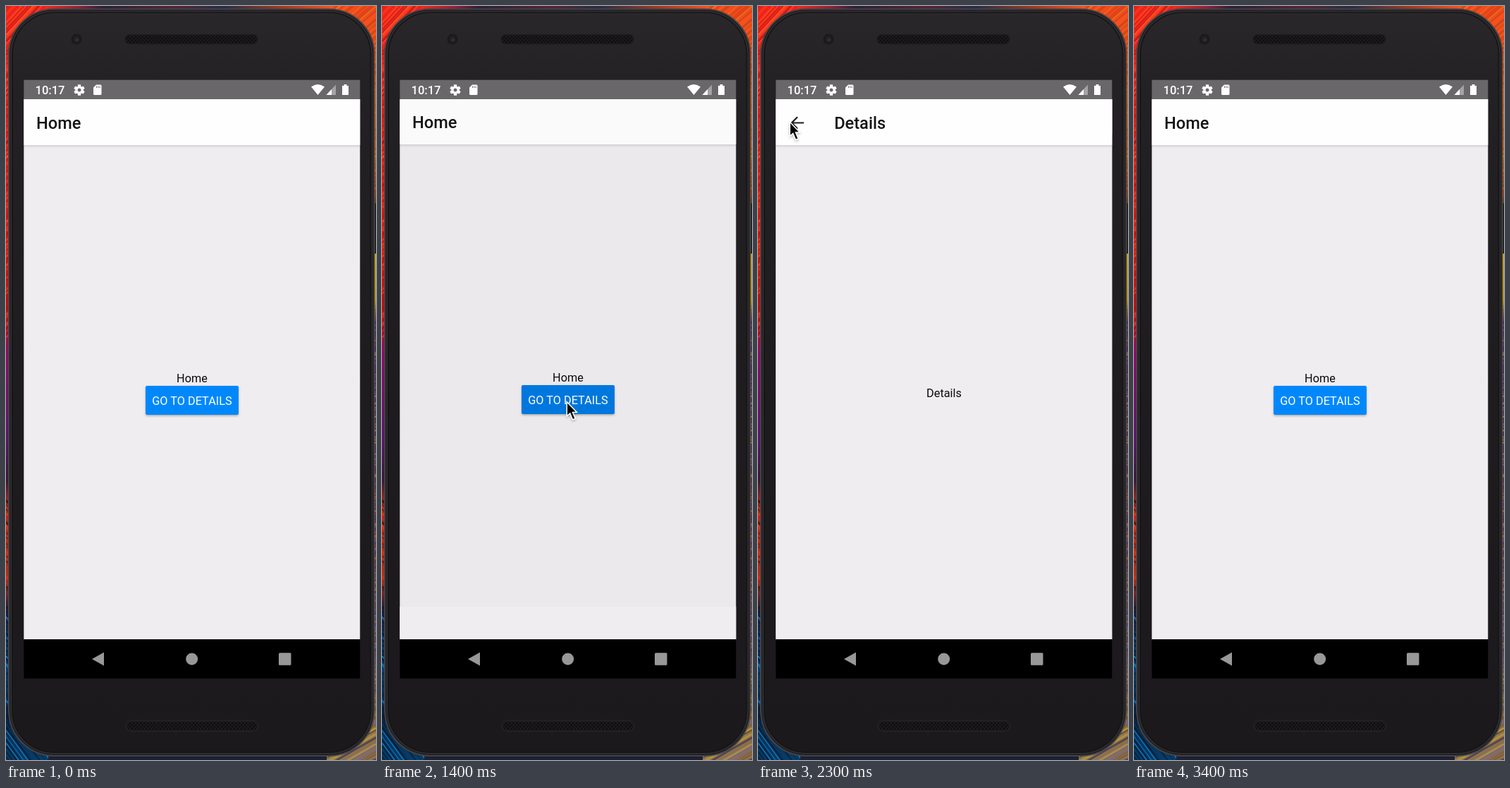
Recreate the animation shown at these times as an HTML page. Size 525 by 1068 pixels, loop 3800 ms.

```html
<!DOCTYPE html>
<html lang="en">
<head>
<meta charset="utf-8">
<title>Screen transition</title>
<style>
  html, body { margin: 0; width: 100%; height: 100%; overflow: hidden; background: #1f1d20; }
  svg { display: block; width: 100%; height: 100%; }
  text { font-family: Roboto, sans-serif; font-size: 16.3px; fill: #0b0b0b; }
  .title { font-size: 23.6px; font-weight: 500; fill: #141414; }
  .mid { text-anchor: middle; }
  .clock { font-size: 16.5px; font-weight: 500; fill: #fff; }
</style>
</head>
<body>
<svg viewBox="0 0 525 1068" preserveAspectRatio="none">
  <defs>
    <linearGradient id="wallL" x2="0" y2="1">
      <stop offset="0" stop-color="#f42a1c"/><stop offset=".25" stop-color="#e41a10"/>
      <stop offset=".4" stop-color="#c41008"/><stop offset=".46" stop-color="#900a68"/>
      <stop offset=".57" stop-color="#5c1470"/><stop offset=".63" stop-color="#381838"/>
      <stop offset=".67" stop-color="#d82c10"/><stop offset=".76" stop-color="#c02c12"/>
      <stop offset=".8" stop-color="#201c3c"/><stop offset=".87" stop-color="#0a4884"/>
      <stop offset=".94" stop-color="#081c38"/><stop offset="1" stop-color="#06406c"/>
    </linearGradient>
    <linearGradient id="wallR" x2="0" y2="1">
      <stop offset="0" stop-color="#f2481c"/><stop offset=".1" stop-color="#e8681c"/>
      <stop offset=".2" stop-color="#b87420"/><stop offset=".26" stop-color="#6c401c"/>
      <stop offset=".33" stop-color="#e0b818"/><stop offset=".39" stop-color="#d0a414"/>
      <stop offset=".42" stop-color="#4c3064"/><stop offset=".56" stop-color="#4c3060"/>
      <stop offset=".7" stop-color="#703844"/><stop offset=".84" stop-color="#5c4478"/>
      <stop offset=".93" stop-color="#80683c"/><stop offset="1" stop-color="#8c7448"/>
    </linearGradient>
    <linearGradient id="wallT">
      <stop offset="0" stop-color="#f4281c"/><stop offset=".12" stop-color="#902038"/>
      <stop offset=".2" stop-color="#2c2038"/><stop offset=".45" stop-color="#542438"/>
      <stop offset=".62" stop-color="#282c48"/><stop offset=".82" stop-color="#a03820"/>
      <stop offset="1" stop-color="#f45420"/>
    </linearGradient>
    <linearGradient id="face" x2="0" y2="1">
      <stop offset="0" stop-color="#292729"/><stop offset=".1" stop-color="#232123"/>
      <stop offset=".5" stop-color="#1e1c1f"/><stop offset="1" stop-color="#1b191c"/>
    </linearGradient>
    <linearGradient id="shade" x2="0" y2="1">
      <stop offset="0" stop-color="#000" stop-opacity=".12"/>
      <stop offset="1" stop-color="#000" stop-opacity="0"/>
    </linearGradient>
    <pattern id="mesh" width="5" height="5" patternUnits="userSpaceOnUse">
      <circle cx="1.2" cy="1.2" r="1.1" fill="#080708"/>
      <circle cx="3.7" cy="3.7" r="1.1" fill="#080708"/>
    </pattern>
    <filter id="soft" x="-20%" y="-20%" width="140%" height="150%">
      <feDropShadow dx="0" dy="1.5" stdDeviation="1.4" flood-opacity=".3"/>
    </filter>
    <clipPath id="screen"><rect x="25.3" y="132" width="477" height="765"/></clipPath>
    <clipPath id="reveal"><rect id="revealBox" x="25" y="132" width="478" height="765"/></clipPath>
    <clipPath id="btnBox"><rect x="198" y="538" width="132" height="41" rx="2"/></clipPath>
  </defs>

  <rect width="263" height="1068" fill="url(#wallL)"/>
  <rect x="263" width="262" height="1068" fill="url(#wallR)"/>
  <g id="streaks"/>
  <rect x="55" width="410" height="7" fill="url(#wallT)"/>
  <rect x="60" y="1058" width="395" height="10" fill="#1c2034"/>

  <rect x="520" y="279" width="5" height="72" rx="1.5" fill="#1a191b"/>
  <rect x="4" y="4.5" width="518.5" height="1057.5" rx="64" fill="#161517" stroke="#454447" stroke-width="2"/>
  <rect x="7" y="7.5" width="512.5" height="1051.5" rx="61" fill="none" stroke="#2f2e31" stroke-width="2"/>
  <rect x="10" y="10" width="506.5" height="1046" rx="58" fill="url(#face)"/>
  <circle cx="100" cy="47" r="7.5" fill="#1a191b"/>
  <circle cx="100" cy="47" r="4.5" fill="#222125"/>
  <circle cx="101" cy="48" r="2" fill="#412c33"/>
  <g id="grilles"/>

  <rect x="25.3" y="104.7" width="477" height="28" fill="#69676a"/>
  <text class="clock" x="41.5" y="125.2">10:17</text>
  <g id="gear" fill="#fff"/>
  <path d="M128 111.500h6q1.500 0 1.500 1.500v11.500q0 1.500-1.500 1.500h-8.500q-1.500 0-1.500-1.500v-9z" fill="#fff"/>
  <path d="M128.500 113.500v2.500m2.300-2.500v2.500m2.300-2.500v2.500" stroke="#69676a"/>
  <path d="M433 114.500Q442.500 107.500 452 114.500L442.500 126z" fill="#fff"/>
  <path d="M454.500 126L468 111.500V126z" fill="#a5a3a6"/>
  <path d="M454.500 126L462 118V126z" fill="#fff"/>
  <path d="M477 113h2.500v-2h4v2h2.500v13h-9z" fill="#fff"/>

  <rect x="25.3" y="897" width="477" height="55.500"/>
  <g fill="#989898">
    <path d="M122 925L139 915.500V934.500z"/>
    <circle cx="263.700" cy="925" r="8.500"/>
    <rect x="387" y="916.300" width="17.500" height="17.500" rx="1.500"/>
  </g>

  <g clip-path="url(#screen)">
    <g id="home">
      <rect x="25" y="132" width="478" height="800" fill="#efedf0"/>
      <rect x="25" y="132" width="478" height="65" fill="#fefefe"/>
      <rect x="25" y="197" width="478" height="4" fill="url(#shade)"/>
      <text class="title" x="43" y="174.300">Home</text>
      <text class="mid" x="264" y="533">Home</text>
      <rect x="198" y="538" width="132" height="41" rx="2" fill="#0488fb" filter="url(#soft)"/>
      <g clip-path="url(#btnBox)"><circle id="press" cx="263" cy="561"/></g>
      <text class="mid" x="264" y="565.300" style="fill:#fff">GO TO DETAILS</text>
    </g>
    <rect id="dim" x="25" y="132" width="478" height="765"/>
    <g clip-path="url(#reveal)">
      <g id="details">
        <rect x="25" y="132" width="478" height="765" fill="#efedf0"/>
        <rect x="25" y="132" width="478" height="65" fill="#fefefe"/>
        <rect x="25" y="197" width="478" height="4" fill="url(#shade)"/>
        <circle id="backPress" cx="56" cy="165.500"/>
        <path d="M65 165.500H48.500M56 157.300L47.800 165.500L56 173.700" fill="none" stroke="#1b1b1b" stroke-width="2.200"/>
        <text class="title" x="108.200" y="174.300">Details</text>
        <text class="mid" x="264" y="554.300">Details</text>
      </g>
    </g>
  </g>

  <path id="cursor" d="M0 0V20L4.500 16.100L8.300 25.200L12 23.600L8.200 14.800H14.200Z"
        stroke="#fff" stroke-width="1.500" filter="url(#soft)"/>
</svg>

<script>
const LOOP = 3800, STEP = 100, TOP = 132, HEIGHT = 765;
const OPEN = 1382, CLOSE = 2866, SLIDE = 425;
const $ = id => document.getElementById(id);
const clamp = v => Math.max(0, Math.min(1, v));
const span = (t, from, to) => clamp((t - from) / (to - from));
const smooth = v => v * v * (3 - 2 * v);

// cubic-bezier(.35, .45, 0, 1)
function ease(x) {
  if (x <= 0 || x >= 1) return clamp(x);
  let lo = 0, hi = 1, s;
  for (let i = 0; i < 24; i++) {
    s = (lo + hi) / 2;
    if (1.05 * (1 - s) ** 2 * s + s ** 3 < x) lo = s; else hi = s;
  }
  return 1.35 * (1 - s) ** 2 * s + 3 * (1 - s) * s * s + s ** 3;
}

// Streaks of paint down one side of the wallpaper.
function paint(rand, x, from, to, slope, colors) {
  let lines = '';
  for (let y = from; y < to; y += 2 + rand() * 5) {
    const color = colors[Math.floor(rand() * colors.length)];
    lines += `<path d="M${x} ${y}l70 ${slope}" stroke="${color}" stroke-width="${1 + rand() * 2}" opacity="${0.35 + rand() * 0.5}"/>`;
  }
  return lines;
}

function drawStill() {
  let seed = 11;
  const rand = () => (seed = seed * 16807 % 2147483647) / 2147483647;
  const red = ['#ff3c20', '#d01010', '#ff5a28', '#a81018'];
  const orange = ['#ff5020', '#e03018', '#f08c20', '#b84818'];
  const blue = ['#1090e0', '#081828', '#0a3864', '#0c1424'];
  const mixed = ['#c09838', '#3c2c64', '#7c4838', '#7060a0', '#a08c58'];
  $('streaks').innerHTML =
    paint(rand, 0, 0, 470, -75, red) +
    paint(rand, 0, 700, 830, 75, ['#e83818', '#201828', '#b02010']) +
    paint(rand, 0, 850, 1070, 95, blue) +
    paint(rand, 455, 0, 330, -60, orange) +
    paint(rand, 455, 470, 1110, -40, mixed);

  $('grilles').innerHTML = [[168, 39.5, 190], [170, 1012, 188]].map(([x, y, w]) =>
    `<rect x="${x}" y="${y}" width="${w}" height="15.5" rx="7.5" fill="#1c1a1d" stroke="#282629"/>
     <rect x="${x + 2}" y="${y + 2}" width="${w - 4}" height="11.5" rx="5.5" fill="url(#mesh)"/>`).join('');

  let teeth = '';
  for (let a = 0; a < 360; a += 60)
    teeth += `<rect x="101.8" y="111.3" width="4.4" height="5" rx=".8" transform="rotate(${a} 104 119)"/>`;
  $('gear').innerHTML = teeth + '<circle cx="104" cy="119" r="4" fill="none" stroke="#fff" stroke-width="3"/>';
}

const path = [
  [400, 300, 1090], [900, 262.3, 560.8], [1700, 262.3, 560.8], [2200, 47, 181],
  [2300, 45.2, 164.3], [3100, 45.2, 164.3], [3400, 62, -30]
];

function placeCursor(t) {
  const shown = t > 400 && t < 3400;
  $('cursor').setAttribute('visibility', shown ? 'visible' : 'hidden');
  if (!shown) return;
  const i = path.findIndex(p => p[0] > t);
  const [a, b] = [path[i - 1], path[i]];
  const k = smooth(span(t, a[0], b[0]));
  $('cursor').setAttribute('transform',
    `translate(${a[1] + (b[1] - a[1]) * k} ${a[2] + (b[2] - a[2]) * k})`);
}

function ripple(id, t, start, hold, end, radius, alpha) {
  $(id).setAttribute('r', radius * smooth(span(t, start, hold)));
  $(id).setAttribute('opacity', alpha * (1 - span(t, hold, end)));
}

function render(t) {
  const p = ease(span(t, OPEN, OPEN + SLIDE)) - ease(span(t, CLOSE, CLOSE + SLIDE));
  const gap = HEIGHT * (1 - p);
  $('home').setAttribute('transform', `translate(0 ${-0.02 * HEIGHT * p})`);
  $('dim').setAttribute('opacity', 0.1 * clamp(p / 0.36));
  $('revealBox').setAttribute('y', TOP + gap);
  $('details').setAttribute('transform', `translate(0 ${0.041 * gap})`);
  $('details').setAttribute('visibility', p > 0 ? 'visible' : 'hidden');
  ripple('press', t, 1140, 1400, 1700, 75, 0.11);
  ripple('backPress', t, 2560, 2800, 3000, 28, 0.13);
  placeCursor(t);
}

// The picture advances ten times a second.
function tick(now) {
  render(Math.floor(now % LOOP / STEP) * STEP);
  requestAnimationFrame(tick);
}

drawStill();
render(0);
requestAnimationFrame(tick);
</script>
</body>
</html>
```
